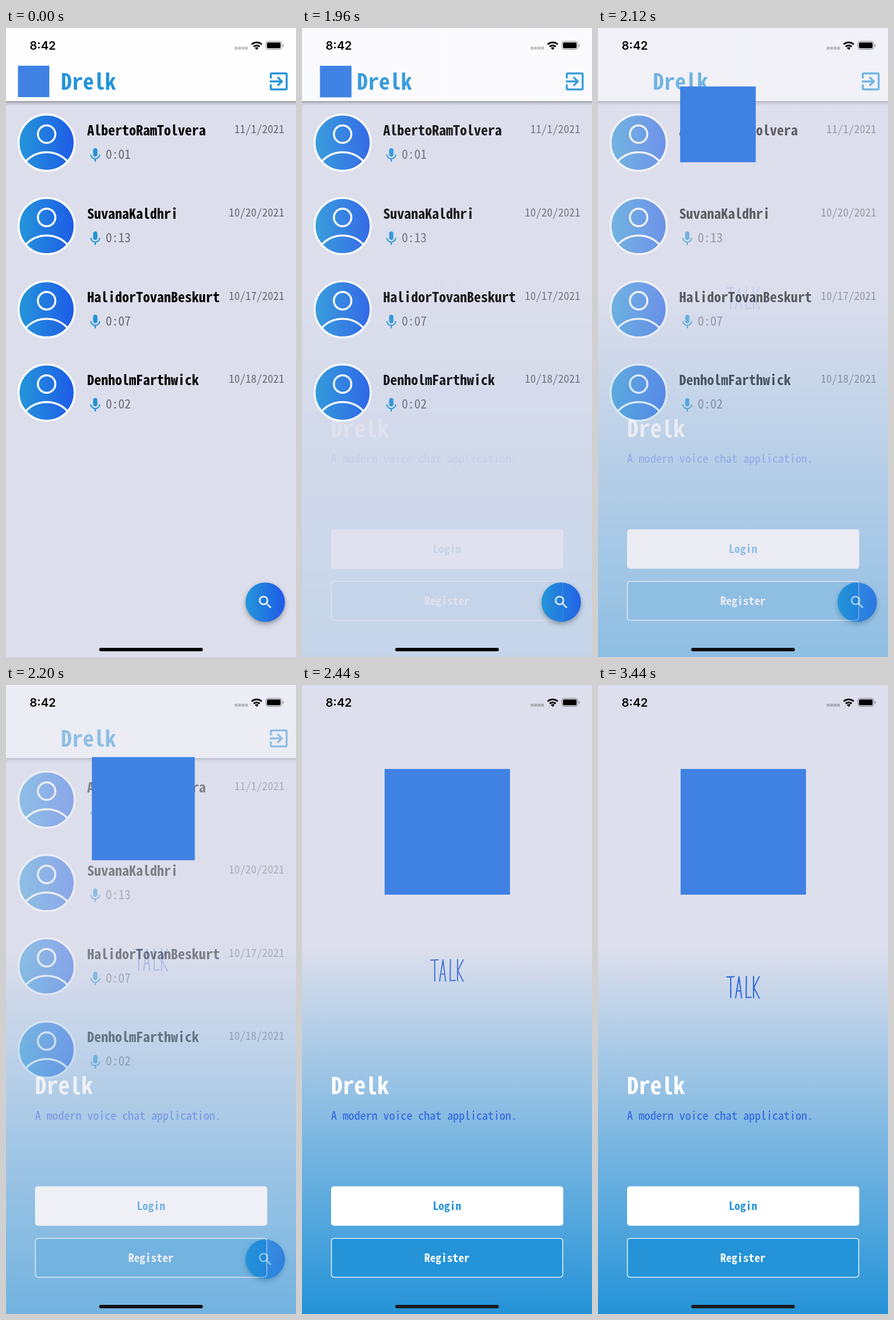
Animation, 509 px wide and 1101 px high, one loop 3480 ms. Source, as an HTML page:

```html
<!DOCTYPE html>
<html lang="en">
<head>
<meta charset="utf-8">
<title>Voice chat sign-out</title>
<style>
  html, body { margin: 0; width: 100%; height: 100%; overflow: hidden; background: #dcdeec; }
  svg { display: block; width: 100%; height: 100%; }
  text {
    font-family: "Noto Sans Mono CJK JP", "Noto Sans Mono", monospace;
    font-size-adjust: ch-width 0.5;
  }
  .bold { font-weight: 700; }
  .mid { text-anchor: middle; }
  .grey { fill: #696975; }
  .clock { font: 600 20.5px Inter, sans-serif; font-size-adjust: none; }
  .line { fill: none; stroke: #fff; stroke-width: 3.5; }
</style>
</head>
<body>
<svg viewBox="0 0 509 1101">
  <defs>
    <linearGradient id="blue"><stop stop-color="#2496d9"/><stop offset="1" stop-color="#1e5ae8"/></linearGradient>
    <linearGradient id="sky" gradientUnits="userSpaceOnUse" x1="0" y1="455" x2="0" y2="1101">
      <stop stop-color="#dedfec"/><stop offset="1" stop-color="#2493d8"/>
    </linearGradient>
    <linearGradient id="shade" x2="0" y2="1">
      <stop stop-opacity=".36"/><stop offset=".4" stop-opacity=".13"/><stop offset="1" stop-opacity="0"/>
    </linearGradient>
    <path id="mic" d="M12 14c1.66 0 3-1.34 3-3V5c0-1.66-1.34-3-3-3S9 3.34 9 5v6c0 1.66 1.34 3 3 3zm5.3-3c0 3-2.54 5.1-5.3 5.1S6.7 14 6.7 11H5c0 3.41 2.72 6.23 6 6.72V21h2v-3.28c3.28-.48 6-3.3 6-6.72z"/>
    <g id="avatar">
      <circle r="49.2" fill="url(#blue)" class="person"/>
      <circle r="49.2" class="line"/>
      <circle cy="-15" r="15.3" class="line"/>
      <path d="M-37 33A50 50 0 0 1 37 33" class="line"/>
    </g>
  </defs>

  <g id="chats">
    <rect width="509" height="1101" fill="#dcdeec"/>
    <rect y="128" width="509" height="8" fill="url(#shade)"/>
    <rect width="509" height="128" fill="#fefeff"/>
    <text x="96.5" y="108" font-size="38.6" class="bold" fill="#2493d8">Drelk</text>
    <path transform="translate(457.8 72.6) scale(1.74)" fill="#2493d8" d="M10.1 15.6L11.5 17l5-5-5-5-1.4 1.4L12.7 11H3v2h9.7zM19 3H5a2 2 0 0 0-2 2v4h2V5h14v14H5v-4H3v4a2 2 0 0 0 2 2h14a2 2 0 0 0 2-2V5a2 2 0 0 0-2-2z"/>
    <g id="rows"></g>
    <circle cx="455" cy="1005" r="34.6" fill="url(#blue)" style="filter: drop-shadow(0 4px 4px rgba(0,0,0,.32))"/>
    <path transform="translate(440.2 990.2) scale(1.25)" fill="#fff" d="M15.5 14h-.8l-.3-.3A6.5 6.5 0 1 0 13.7 14.4l.3.3v.8l5 5L20.5 19zm-6 0a4.5 4.5 0 1 1 0-9 4.5 4.5 0 0 1 0 9z"/>
  </g>

  <g id="welcome">
    <rect width="509" height="1101" fill="url(#sky)"/>
    <g id="word" role="img" aria-label="TALK" fill="none" stroke="#2a62da" stroke-width="2" stroke-linecap="round" stroke-linejoin="round">
      <path d="M226 1.5L239 1M233 1.5V38M241.5 38L247.5 1L252 38M243.5 26H250.5M260.5 0.5L260 37.5L269 37M273 0.5V38M283 1L273.5 20L283 38.5"/>
    </g>
    <text x="51" y="716" font-size="40.6" class="bold" fill="#fff">Drelk</text>
    <text x="51" y="761" font-size="20.4" fill="#2a5fe0">A modern voice chat application.</text>
    <rect x="51" y="877.5" width="407.5" height="69" rx="5" fill="#fff"/>
    <text x="254.5" y="919" font-size="19.9" class="bold mid" fill="#2493d8">Login</text>
    <rect x="51.6" y="968.6" width="406" height="68" rx="5" fill="#2493d8" stroke="#fff" stroke-width="1.4"/>
    <text x="254.5" y="1010" font-size="19.9" class="bold mid" fill="#fff">Register</text>
  </g>

  <rect id="badge" fill="#3f82e4"/>

  <g id="status">
    <text x="41.5" y="37.7" class="clock">8:42</text>
    <path d="M401.5 35.3h23" stroke="#000" stroke-opacity=".24" stroke-width="5" stroke-dasharray="5 1"/>
    <g fill="none" stroke="#000" stroke-width="3">
      <path d="M431.2 28.8a12.4 12.4 0 0 1 17.6 0M434.7 32.6a7.6 7.6 0 0 1 10.6 0"/>
    </g>
    <path d="M440 38.2l-3.2-3.3a4.7 4.7 0 0 1 6.4 0z"/>
    <rect x="456" y="23.3" width="28" height="14.2" rx="4" fill="none" stroke="#000" stroke-opacity=".45"/>
    <rect x="458" y="25.2" width="24" height="10.4" rx="2.4"/>
    <path d="M485.8 28v5a2.7 2.7 0 0 0 0-5z" opacity=".45"/>
  </g>
  <rect id="home" x="163.5" y="1085" width="182" height="6" rx="3"/>
</svg>

<script>
const LOOP = 3480, START = 1898, DURATION = 534;
const $ = id => document.getElementById(id);
const clamp = v => Math.min(1, Math.max(0, v));

const chats = [
  ["AlbertoRamTolvera", "0:01", "11/1/2021"],
  ["SuvanaKaldhri", "0:13", "10/20/2021"],
  ["HalidorTovanBeskurt", "0:07", "10/17/2021"],
  ["DenholmFarthwick", "0:02", "10/18/2021"],
];
$("rows").innerHTML = chats.map(([name, length, date], i) => `
  <g transform="translate(0 ${i * 145.8})">
    <use href="#avatar" x="71.3" y="200.8"/>
    <text x="142.5" y="188" font-size="24.5" class="bold">${name}</text>
    <use href="#mic" transform="translate(141.7 207.7) scale(1.25)" fill="#2493d8"/>
    <text x="175" y="229" font-size="22" class="grey">${length}</text>
    <text x="488.5" y="184" font-size="19.5" class="grey" text-anchor="end">${date}</text>
  </g>`).join("");

// cubic-bezier(.4, 0, .2, 1), solved by bisection
function ease(x) {
  let lo = 0, hi = 1, s = .5;
  for (let i = 0; i < 24; i++) {
    s = (lo + hi) / 2;
    const bx = 1.2 * s * (1 - s) ** 2 + .6 * s * s * (1 - s) + s ** 3;
    if (bx < x) lo = s; else hi = s;
  }
  return s * s * (3 - 2 * s);
}

// Point on the circular arc that leaves the first point horizontally
function arc(x0, y0, x1, y1, t) {
  const dist = Math.hypot(x1 - x0, y1 - y0);
  const radius = dist * dist / (2 * (y1 - y0));
  const angle = 2 * Math.asin(dist / (2 * radius)) * t;
  return [x0 + radius * Math.sin(angle), y0 + radius * (1 - Math.cos(angle))];
}

function setAttributes(element, values) {
  for (const key in values) element.setAttribute(key, values[key]);
}

function draw(time) {
  const progress = clamp((time - START) / DURATION);
  $("welcome").setAttribute("opacity", progress);

  // The badge fits inside a box whose corners travel on separate arcs
  const t = ease(progress);
  const [left, top] = arc(21, 66, 145, 147, t);
  const [right, bottom] = arc(76, 121, 365, 367, t);
  const size = Math.min(right - left, bottom - top);
  setAttributes($("badge"), {
    x: (left + right - size) / 2, y: (top + bottom - size) / 2, width: size, height: size,
  });

  const wordTop = 515.9 - 35.9 * Math.exp((2440 - time) / 575);
  setAttributes($("word"), {
    transform: `translate(0 ${wordTop})`, opacity: clamp((time - START) / 650),
  });

  const shade = Math.round(28 * progress);
  $("home").setAttribute("fill", `rgb(${shade},${shade},${shade + 2})`);
}

const begin = performance.now();
function tick() {
  draw((performance.now() - begin) % LOOP);
  requestAnimationFrame(tick);
}
tick();
</script>
</body>
</html>
```
